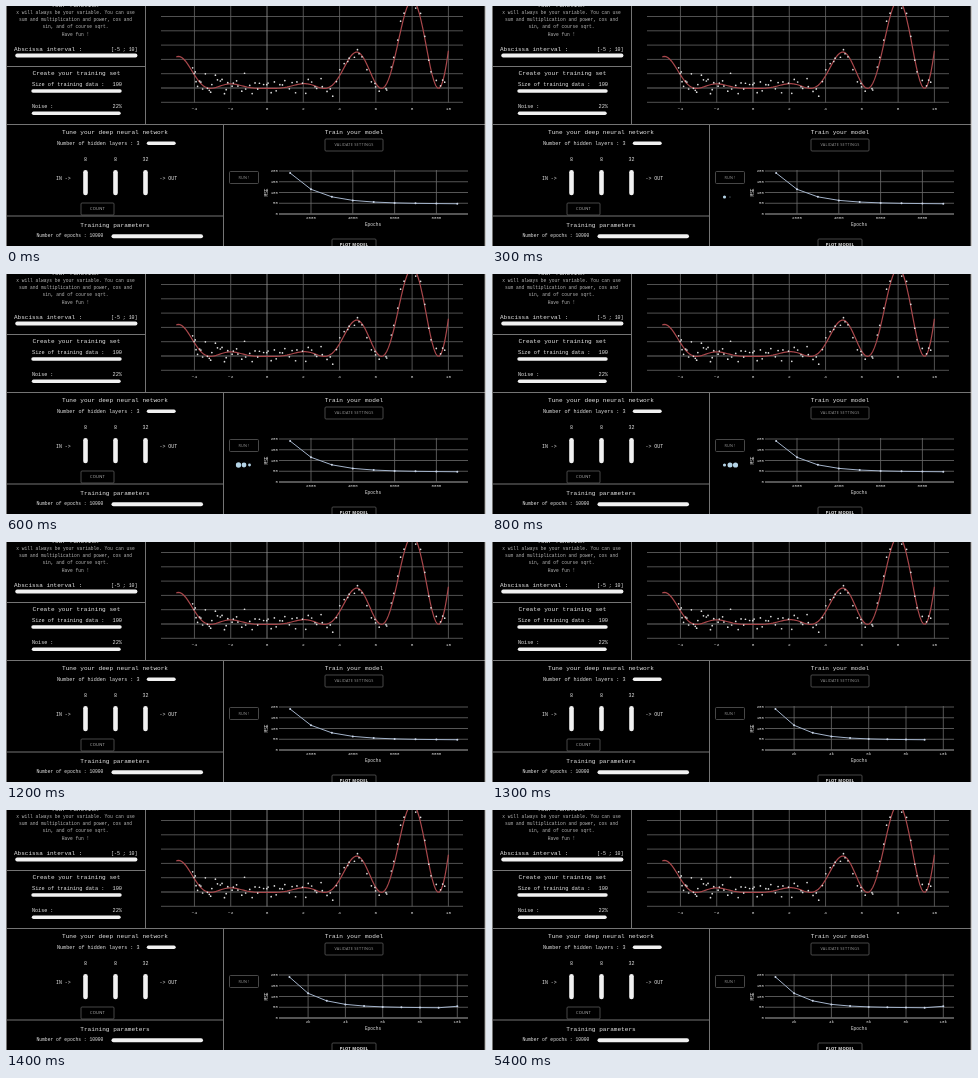
Write an HTML page that moves like this. It is 480 px wide and 240 px high and loops after 8 s.

```html
<!DOCTYPE html>
<html lang="en">
<head>
<meta charset="utf-8">
<title>Neural network playground</title>
<style>
html, body { margin: 0; width: 100%; height: 100%; overflow: hidden; background: #000; }
svg { display: block; width: 100vw; height: 100vh; }
text { font-family: "Liberation Mono", "Courier New", monospace; fill: #e4e4e4; white-space: pre; }
.intro { fill: #b4b4b4; }
.button { font-family: "Open Sans", Arial, sans-serif; letter-spacing: .25px; }
</style>
</head>
<body>
<svg id="stage" viewBox="0 0 480 240">
  <rect width="480" height="240" fill="#000"/>
  <g id="panels"></g>
  <g id="fit"></g>
  <g id="loss"></g>
  <g id="dots" fill="#b4d3e6"></g>
</svg>
<script>
const NS = "http://www.w3.org/2000/svg";
const LOOP = 8000;
const $ = id => document.getElementById(id);
const panels = $("panels"), fit = $("fit"), loss = $("loss"), dots = $("dots");

function add(parent, tag, attrs) {
  const el = document.createElementNS(NS, tag);
  for (const k in attrs) el.setAttribute(k, attrs[k]);
  parent.appendChild(el);
  return el;
}

function line(parent, x1, y1, x2, y2, stroke, width = 1) {
  return add(parent, "line", { x1, y1, x2, y2, stroke, "stroke-width": width });
}

// y is the vertical middle of the lower-case letters
function label(parent, str, x, y, size, anchor = "start", more = {}) {
  const el = add(parent, "text", { x, y: y + size * 0.3, "font-size": size, "text-anchor": anchor, ...more });
  el.textContent = str;
}

const heading = (str, x, y) => label(panels, str, x, y, 6.1, "middle");

function slider(x1, y1, x2, y2, width) {
  line(panels, x1, y1, x2, y2, "#f1f1f1", width).setAttribute("stroke-linecap", "round");
}

function button(str, x, y, w, color, size, weight = 400) {
  add(panels, "rect", { x, y, width: w, height: 12, rx: 1, fill: "none", stroke: "#5a5a5a", "stroke-width": 0.8 });
  label(panels, str, x + w / 2, y + 6.1, size, "middle",
    { class: "button", style: `fill:${color};font-weight:${weight}` });
}

function drawPanels() {
  const edge = "#747474";
  line(panels, 0, 60.5, 139.5, 60.5, edge);
  line(panels, 0, 118.5, 480, 118.5, edge);
  line(panels, 0, 210, 217.5, 210, edge);
  line(panels, 139.5, 0, 139.5, 118.5, edge);
  line(panels, 217.5, 118.5, 217.5, 240, edge);
  line(panels, 0.5, 0, 0.5, 240, edge);
  line(panels, 479.3, 0, 479.3, 240, "#dcdcdc", 1.2);

  heading("Your function", 69, -1.3);
  ["x will always be your variable. You can use",
   "sum and multiplication and power, cos and",
   "sin, and of course sqrt.",
   "Have fun !"].forEach((s, i) => label(panels, s, 69.5, 6.6 + i * 7.2, 4.6, "middle", { class: "intro" }));

  label(panels, "Abscissa interval :", 8, 43.3, 6);
  label(panels, "[-5 ; 10]", 131.5, 43.3, 4.9, "end");
  slider(11.2, 49.5, 129.5, 49.5, 3.8);

  heading("Create your training set", 70.5, 67.5);
  label(panels, "Size of training data :", 26, 78.3, 5.25);
  label(panels, "100", 116, 78.3, 5.3, "end");
  slider(27, 85, 114, 85, 3.4);
  label(panels, "Noise :", 26, 100.5, 5.1);
  label(panels, "22%", 116, 100.5, 5.3, "end");
  slider(27.5, 107.2, 113, 107.2, 3.4);

  heading("Tune your deep neural network", 109, 126);
  label(panels, "Number of hidden layers : 3", 51, 137, 5.1);
  slider(142.5, 137.3, 168, 137.3, 3.4);
  ["8", "8", "32"].forEach((s, i) => {
    const x = 79.5 + i * 30;
    label(panels, s, x, 153, 5, "middle");
    slider(x, 166.2, x, 187, 4.6);
  });
  label(panels, "IN ->", 50, 172.5, 4.9);
  label(panels, "-> OUT", 153.5, 172.5, 4.9);
  button("COUNT", 75, 197, 33, "#bdbdbd", 4);

  heading("Training parameters", 109, 218.7);
  label(panels, "Number of epochs : 10000", 30.5, 230, 4.65);
  slider(107.5, 230.2, 195, 230.2, 4);

  heading("Train your model", 348, 126);
  button("VALIDATE SETTINGS", 319, 133, 58, "#9a9a9a", 3.8);
  button("RUN !", 223.5, 165.5, 29, "#9a9a9a", 3.8);
  button("PLOT MODEL", 326, 233, 44, "#f2f2f2", 4.1, 700);
}

const fitX = x => 261 + x * 18.14;
const fitY = x => 82.4 - (1.4 + 0.15 * Math.exp(-((x - 5) ** 2))) * (x * Math.sin(x - 0.03)) ** 2;

function seeded(seed) {
  return () => (seed = seed * 16807 % 2147483647) / 2147483647;
}

function drawFit() {
  const grid = "#666";
  for (let i = 0; i < 7; i++) {
    const y = 10.5 + i * 14.3;
    line(fit, 155, y, 457, y, i === 5 ? "#888" : grid, 0.8);
  }
  for (let n = -4; n <= 10; n += 2) {
    const x = fitX(n);
    line(fit, x, 0, x, 96.5, n ? grid : "#999", 0.8);
    label(fit, String(n).replace("-", "−"), x, 103, 4.4, "middle");
  }
  const curve = [];
  for (let x = -5; x <= 10.01; x += 0.1) curve.push([fitX(x), fitY(x)]);
  add(fit, "polyline", { points: curve.join(" "), fill: "none", stroke: "#a8474b", "stroke-width": 1.2 });

  // training samples: denser on the left, scattered around the curve
  const rnd = seeded(4217), count = 88;
  for (let i = 0; i < count; i++) {
    const x = -4.1 + 14.1 * ((i + rnd()) / count) ** 1.3;
    const noise = (rnd() + rnd() + rnd() - 1.5) * 11;
    add(fit, "circle", { cx: fitX(x), cy: fitY(x) - 1 + noise, r: 0.85, fill: "#dedede" });
  }
}

// fast decay, then a flat tail that dips at the end
const lossY = k => 196.9 + 0.1 * k - 30 * 0.46 ** (k - 1) - 1.6 * Math.max(0, k - 9);

// count: plotted points; span: thousands of epochs on the axis
function drawLoss(count, span, columns) {
  loss.replaceChildren();
  const step = span === 9 ? 20.9 : 18.65;
  const px = k => 451.3 - (span - k) * step;
  const grid = "#6c6c6c";
  for (let v = 0; v <= 200; v += 50) {
    const y = 208 - v * 0.215;
    line(loss, 273, y, 462, y, v ? grid : "#aaa", v ? 0.8 : 1.1);
    label(loss, v, 272, y, 4.1, "end");
  }
  for (let k = 2; k <= span; k += 2) {
    if (columns) line(loss, px(k), 164, px(k), 208, grid, 0.8);
    label(loss, span === 9 ? k + "000" : k + "k", px(k), 211.7, 4.1, "middle");
  }
  label(loss, "Epochs", 367, 218.3, 4.5, "middle");
  label(loss, "MSE", 0, 0, 4.5, "middle", { transform: "translate(260.5 186.5) rotate(-90)" });
  const pts = Array.from({ length: count }, (_, i) => [px(i + 1), lossY(i + 1)]);
  add(loss, "polyline", { points: pts.join(" "), fill: "none", stroke: "#a3b3ca", "stroke-width": 1 });
  pts.forEach(([cx, cy]) => add(loss, "circle", { cx, cy, r: 1, fill: "#cbd6e8" }));
}

// close to the CSS ease-in-out curve
const ease = x => x * x * (3 - 2 * x);

function bounce(age) {
  const p = (age + 1400) % 1400;
  if (p >= 1120) return 0;
  return ease(p < 560 ? p / 560 : (1120 - p) / 560);
}

drawPanels();
drawFit();
const balls = [0, 1, 2].map(i => add(dots, "circle", { cx: 232.5 + i * 5.5, cy: 191, r: 0 }));

let shown = "";
function render(ms) {
  const t = Math.floor((ms % LOOP) / 100) * 100;
  const busy = t >= 100 && t < 1000;
  balls.forEach((b, i) => b.setAttribute("r", busy ? 2.7 * bounce(t + 10 - i * 160) : 0));

  const count = t < 1400 ? 9 : 10;
  const span = t < 1300 ? 9 : 10;
  const columns = t < 1200 || t >= 1300;
  const state = [count, span, columns];
  if (shown !== String(state)) {
    shown = String(state);
    drawLoss(...state);
  }
}

const start = performance.now();
function tick() {
  render(performance.now() - start);
  requestAnimationFrame(tick);
}
tick();
</script>
</body>
</html>
```
